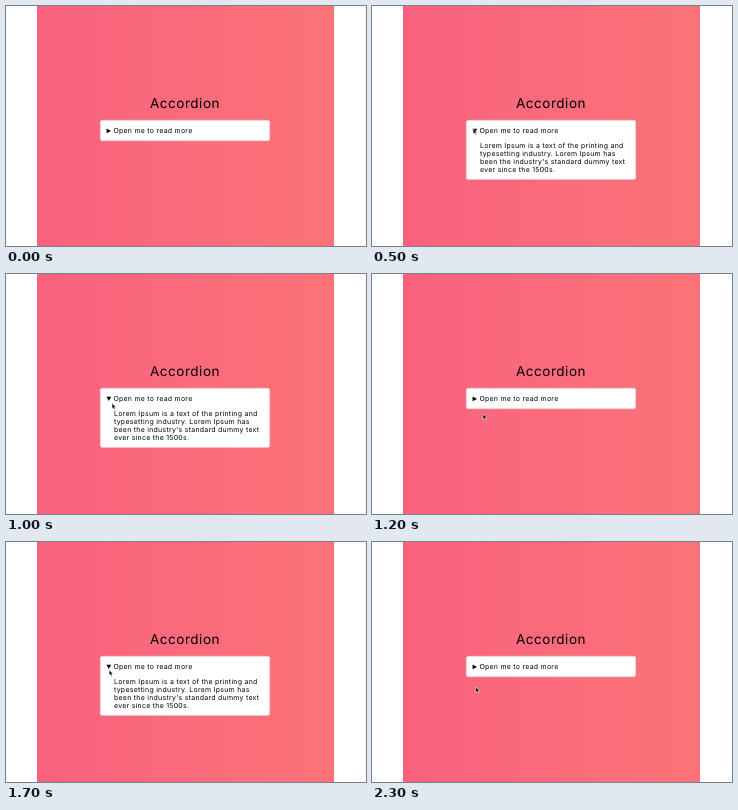
These frames come from a looping animation (360 px wide and 240 px high, 2.4 s). An HTML page:

```html
<!DOCTYPE html>
<html lang="en">
<head>
<meta charset="utf-8">
<title>Accordion</title>
<style>
  html, body { margin: 0; width: 100%; height: 100%; overflow: hidden; background: #fff; }
  svg { display: block; width: 360px; height: 240px; }
  text {
    font-family: Inter, "Open Sans", sans-serif;
    letter-spacing: .04em;
    text-rendering: geometricPrecision;
  }
  .title { font-size: 13.5px; }
  .copy { font-size: 6.95px; }
</style>
</head>
<body>
<svg viewBox="0 0 360 240">
  <defs>
    <linearGradient id="pink">
      <stop offset="0" stop-color="#f9627f"/>
      <stop offset="1" stop-color="#fb7377"/>
    </linearGradient>
  </defs>
  <rect x="31" width="297" height="240" fill="url(#pink)"/>
  <text class="title" x="179" y="102.4" text-anchor="middle">Accordion</text>
  <rect id="card" x="94.3" y="114.2" width="169.4" rx="2" fill="#fff" stroke="#e6ccd4" stroke-width=".6"/>
  <path id="marker" d="M-2.2 -2.4L2.2 0L-2.2 2.4Z"/>
  <text class="copy" x="107.4" y="127.4">Open me to read more</text>
  <g id="panel" class="copy"></g>
  <path id="cursor" d="M0 0V5.4L1.2 4.3L2.1 6.4L3.1 6L2.2 4H3.9Z"
        stroke="#fff" stroke-width=".5" stroke-linejoin="round"/>
</svg>
<script>
  const LOOP = 2400, STEP = 100, FIRST_OPEN = 500, SUMMARY_BOTTOM = 135;
  const LINES = [
    "Lorem Ipsum is a text of the printing and",
    "typesetting industry. Lorem Ipsum has",
    "been the industry's standard dummy text",
    "ever since the 1500s."
  ];
  // where the pointer turns; it moves evenly in between
  const TURNS = [
    { t: 100, x: 84, y: 188 },
    { t: 400, x: 100.5, y: 122 },
    { t: 900, x: 103.6, y: 124 },
    { t: 1200, x: 111, y: 140 },
    { t: 1600, x: 103.4, y: 126.8 },
    { t: 2200, x: 102, y: 133.8 },
    { t: 2300, x: 103.6, y: 145 }
  ];
  const [card, marker, panel, cursor] =
    ["card", "marker", "panel", "cursor"].map(id => document.getElementById(id));

  LINES.forEach((line, i) => {
    const text = document.createElementNS("http://www.w3.org/2000/svg", "text");
    text.setAttribute("x", 108);
    text.setAttribute("y", 141.6 + 8.1 * i);
    text.textContent = line;
    panel.append(text);
  });

  const lerp = (a, b, k) => a + (b - a) * k;

  function pointerAt(t) {
    const i = Math.max(1, TURNS.findIndex(p => p.t >= t));
    const a = TURNS[i - 1], b = TURNS[i];
    const k = (t - a.t) / (b.t - a.t);
    return { x: lerp(a.x, b.x, k), y: lerp(a.y, b.y, k) };
  }

  function draw(time) {
    const t = Math.floor(time % LOOP / STEP) * STEP;
    const { x, y } = pointerAt(t);
    const open = t >= FIRST_OPEN && y < SUMMARY_BOTTOM;
    card.setAttribute("height", open ? 59.2 : 20.6);
    marker.setAttribute("transform", `translate(102.8 124.9) rotate(${open ? 90 : 0})`);
    panel.style.display = open ? "" : "none";
    cursor.style.display = t < TURNS[0].t ? "none" : "";
    cursor.setAttribute("transform", `translate(${x} ${y})`);
  }

  const start = performance.now();
  function tick() {
    draw(performance.now() - start);
    requestAnimationFrame(tick);
  }
  tick();
</script>
</body>
</html>
```
